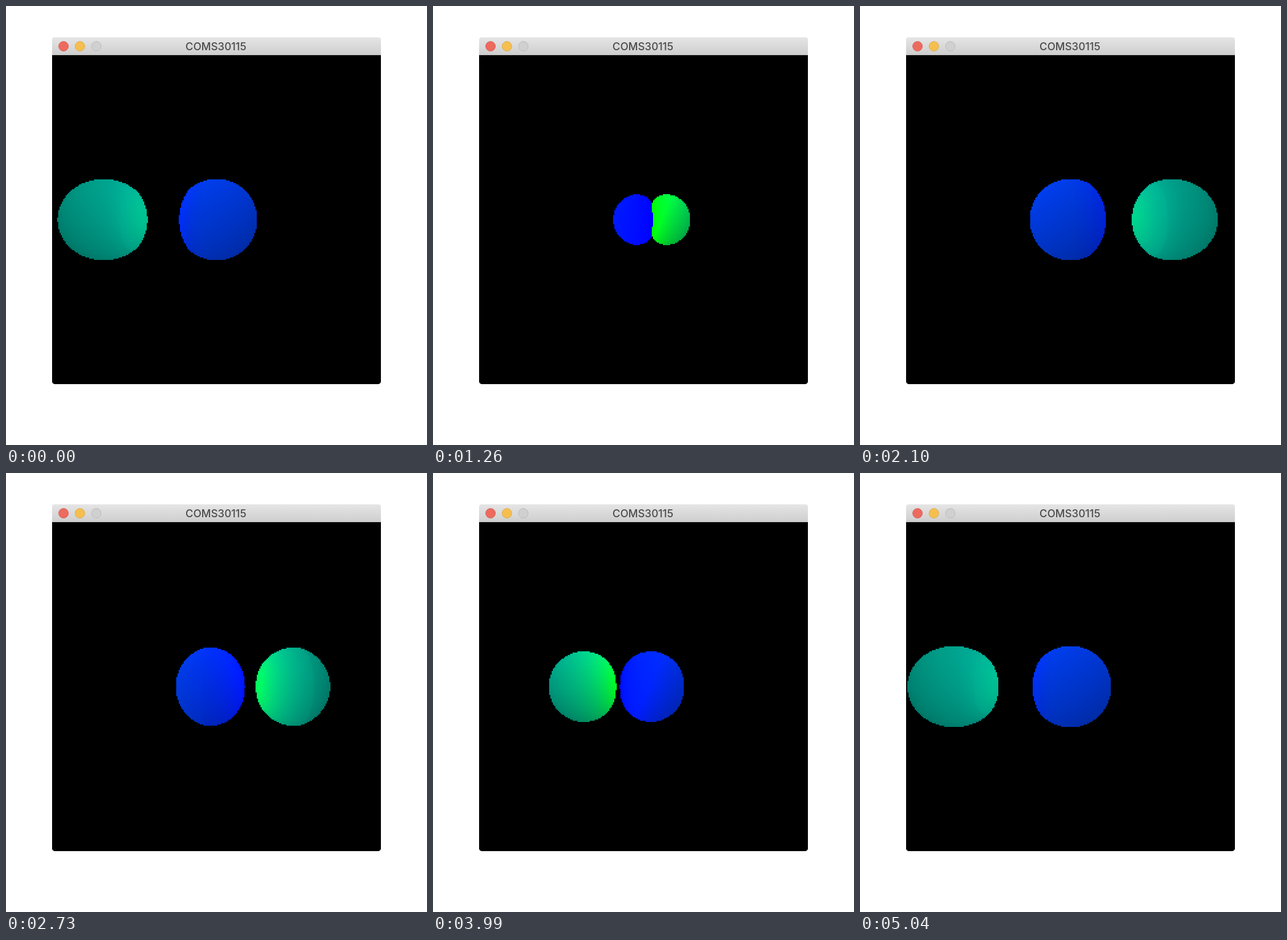
Write an HTML page with a canvas that moves like this. It is 685 px wide and 714 px high and loops after 5250 ms.

```html
<!DOCTYPE html>
<html lang="en">
<head>
<meta charset="utf-8">
<title>COMS30115</title>
<style>
  html, body { margin: 0; width: 100%; height: 100%; overflow: hidden; background: #fff; }
  svg { position: absolute; left: 0; top: 0; }
  canvas {
    position: absolute; left: 75px; top: 80px; width: 535px; height: 535px;
    background: #000; border-radius: 0 0 5px 5px; image-rendering: pixelated;
  }
  text { font: 500 17.2px Inter, Roboto, sans-serif; fill: #4b4b4b; text-anchor: middle; }
</style>
</head>
<body>
<svg width="685" height="714" viewBox="0 0 685 714">
  <defs>
    <linearGradient id="bar" x1="0" y1="0" x2="0" y2="1">
      <stop offset="0" stop-color="#e5e5e5"/>
      <stop offset="1" stop-color="#cecece"/>
    </linearGradient>
  </defs>
  <path d="M75 80V55q0-4 4-4H606q4 0 4 4V80z" fill="url(#bar)"/>
  <path d="M75 79.5H610" stroke="#bcbcbc"/>
  <circle cx="93.6" cy="65.5" r="7.8" fill="#ed6a5f" stroke="#dc5b51"/>
  <circle cx="120.3" cy="65.5" r="7.8" fill="#f5bf50" stroke="#e0ac45"/>
  <circle cx="147" cy="65.5" r="7.8" fill="#d0d0d0" stroke="#bdbdbd"/>
  <text x="341.6" y="72.3">COMS30115</text>
</svg>
<canvas id="view" width="267" height="267"></canvas>
<script>
const SIZE = 267, VIEW = 535, STEP = 210, STEPS = 25;
const FOCAL = 321, DEPTH = 5, TINT_RANGE = 1.68;
const LIGHT = [-1, 1.5, -0.2];

// [step, x] of the moving sphere, linear in between
const PATH = [[0, -2.74], [2, -1.665], [6, 0.41], [10, 2.48], [11, 2.98], [12, 2.82],
  [13, 1.72], [15, 0.755], [19, -1.28], [22, -2.87], [23, -3.05], [24, -2.83]];

const ctx = document.getElementById('view').getContext('2d');
const cache = [];

function sphereX(step) {
  let i = 1;
  while (PATH[i][0] < step) i++;
  const [s0, x0] = PATH[i - 1], [s1, x1] = PATH[i];
  return x0 + (x1 - x0) * (step - s0) / (s1 - s0);
}

const ball = (x, y, z, cx) => Math.hypot(x - cx, y, z) - 1;

// Two unit spheres that shrink away from the plane between them
function field(x, y, z, cx) {
  const a = ball(x, y, z, 0), b = ball(x, y, z, cx);
  return Math.min(a, b) + Math.max(0.6 - 0.545 * Math.sqrt(Math.abs(a - b)), 0);
}

function march(dx, dy, cx) {
  const len = Math.hypot(dx, dy, 1);
  let t = 3.8;
  for (let i = 0; i < 150 && t < 6.2; i++) {
    const d = field(dx * t, dy * t, t - DEPTH, cx);
    if (d < 0.003) return t;
    t += 0.35 * d / len;
  }
  return 0;
}

function shade(x, y, z, cx) {
  const e = 0.01;
  const n = [
    field(x + e, y, z, cx) - field(x - e, y, z, cx),
    field(x, y + e, z, cx) - field(x, y - e, z, cx),
    field(x, y, z + e, cx) - field(x, y, z - e, cx)
  ];
  const a = ball(x, y, z, 0), b = ball(x, y, z, cx);
  const green = b < a;
  const l = [LIGHT[0] - (green ? cx : 0), LIGHT[1], LIGHT[2]];
  const dot = (n[0] * l[0] + n[1] * l[1] + n[2] * l[2]) / (Math.hypot(...n) * Math.hypot(...l));
  const near = Math.max(1 - Math.abs(a - b) / TINT_RANGE, 0);
  const boost = 1 + 0.8 * near * near;
  if (green) {
    const g = (140 + 32 * dot) * boost;
    return [g, g * 0.87 * (1 - near ** 2.5)];
  }
  const v = (200 + 40 * dot) * boost;
  return [v * 0.26 * (1 - near ** 1.3), v];
}

function render(step) {
  const img = ctx.createImageData(SIZE, SIZE), cx = sphereX(step);
  const toRay = i => ((i + 0.5) * VIEW / SIZE - VIEW / 2) / FOCAL;
  for (let j = 0; j < SIZE; j++) {
    const dy = -toRay(j);
    for (let i = 0; i < SIZE; i++) {
      const p = (j * SIZE + i) * 4;
      img.data[p + 3] = 255;
      if (Math.abs(dy) > 0.22) continue;
      const dx = toRay(i), t = march(dx, dy, cx);
      if (!t) continue;
      const [g, b] = shade(dx * t, dy * t, t - DEPTH, cx);
      img.data[p + 1] = g;
      img.data[p + 2] = b;
    }
  }
  return img;
}

let shown = -1;
function draw(now) {
  const step = Math.floor(now / STEP) % STEPS;
  if (step !== shown) {
    cache[step] = cache[step] || render(step);
    ctx.putImageData(cache[step], 0, 0);
    shown = step;
  }
}

const start = performance.now();
function tick() {
  draw(performance.now() - start);
  requestAnimationFrame(tick);
}
tick();
</script>
</body>
</html>
```
